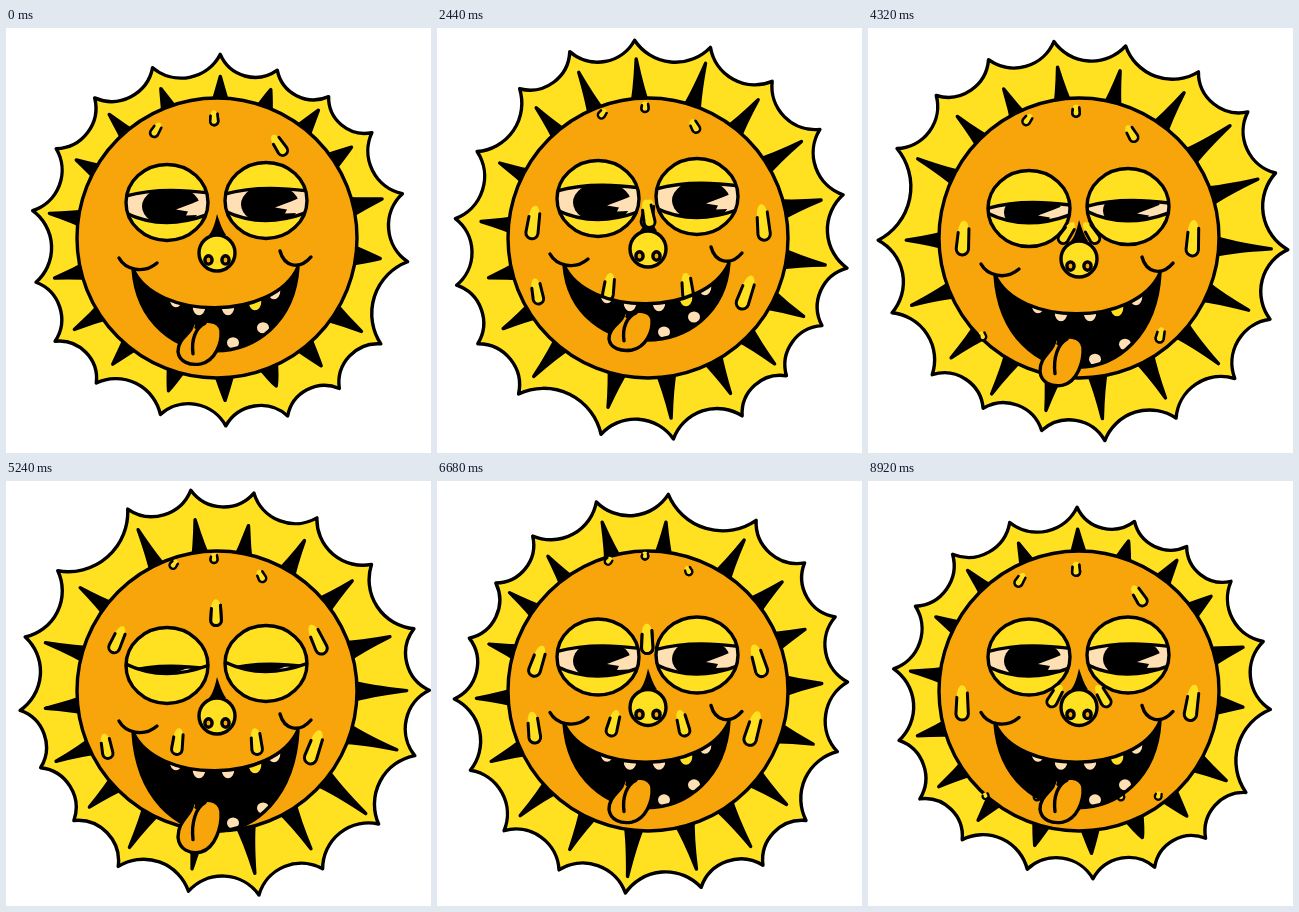
These frames come from a looping animation (425 px wide and 425 px high, 8.96 s). An HTML page:

```html
<!DOCTYPE html>
<html lang="en">
<head>
<meta charset="utf-8">
<title>Sweating sun</title>
<style>
  html, body { margin: 0; width: 100%; height: 100%; overflow: hidden; background: #fff; }
  svg { display: block; width: 100vw; height: 100vh; }
  .ink { stroke: #000; stroke-width: 3.4; stroke-linejoin: round; stroke-linecap: round; }
  .line { fill: none; }
  .yellow { fill: #ffe122; }
  .orange { fill: #f8a50b; }
  .cream { fill: #ffe0b5; }
</style>
</head>
<body>
<svg viewBox="0 0 425 425">
  <defs>
    <clipPath id="eyeClip"><ellipse rx="41" ry="38"/></clipPath>
    <clipPath id="mouthClip"><path id="mouthClipPath"/></clipPath>
  </defs>
  <path id="corona" class="ink yellow"/>
  <path id="spikes" class="ink" stroke-width="2"/>
  <circle class="ink orange" cx="211" cy="210" r="140"/>
  <g id="eyes">
    <path d="M211 187C209 196 207 203 203 208H220C216 202 214 196 211 187Z"/>
  </g>
  <g id="drops"></g>
  <g id="nose">
    <circle class="ink yellow" cx="211" cy="226" r="18"/>
    <g class="ink orange" stroke-width="2.6">
      <ellipse cx="202.500" cy="233" rx="3.600" ry="4.200"/>
      <ellipse cx="219.500" cy="233" rx="3.600" ry="4.200"/>
    </g>
  </g>
  <path id="mouth"/>
  <g clip-path="url(#mouthClip)">
    <g id="upperTeeth"></g>
    <g id="lowerTeeth"></g>
  </g>
  <path id="lips" class="ink line"/>
  <path id="creases" class="ink line" d="M113 231C119 242 137 248 151 236M274 224C278 239 293 244 305 230"/>
  <g id="tongue">
    <path class="ink orange" vector-effect="non-scaling-stroke"
      d="M187 292C187 304 172 306 172 321C173 331 184 335 195 333C209 330 216 313 215 300C213 290 197 288 190 297"/>
    <path class="ink line" vector-effect="non-scaling-stroke" d="M187 323C185 309 190 297 199 293"/>
  </g>
</svg>
<script>
const LOOP = 8960, BOB = 1120, STEP = 40;
const CENTER = { x: 214.3, y: 212.4 };
const DROP_TRAVEL = 537;

// Each ray: angle in degrees clockwise from the top, tip radius, spike radius.
const rays = [
  [0, 186, 165], [18.5, 179.5, 160], [37, 180, 164], [54.6, 186, 162], [75.6, 188, 168],
  [96.5, 188.5, 162], [122.8, 191, 169], [141.2, 190, 162], [159, 188, 157],
  [178.3, 185.5, 161], [199, 184, 160], [221, 189, 165], [238.6, 193.5, 172],
  [257.2, 189, 171], [279, 190, 174], [299.2, 188, 166], [318.6, 190, 169], [338.6, 185.5, 164]
];

// Sweat paths: progress, x, y, drop length.
const leftPath = [
  [40, 184, 74, 0], [90, 171, 80, 9], [115, 152, 99, 15], [154, 115, 152, 27],
  [187, 97, 187, 33], [223, 94, 223, 35], [250, 97, 250, 31], [268, 101, 268, 24],
  [293, 109, 295, 14], [316, 118, 316, 6], [328, 122, 325, 0]
];
const rightPath = [
  [70, 247, 80, 0], [90, 252, 91, 11], [115, 271, 115, 23], [154, 308, 152, 31],
  [179, 321, 178, 33], [194, 326, 194, 36], [223, 324, 223, 36], [250, 315, 251, 35],
  [268, 307, 269, 35], [293, 296, 293, 28], [316, 290, 316, 7], [328, 287, 324, 0]
];
const middlePath = side => [
  [70, 208, 72, 0], [90, 208, 75, 9], [115, 208, 88, 14], [154, 210, 124, 25],
  [179, 210, 155, 30], [195, 211, 187, 28], [208, 211 + side * 10, 203, 24],
  [223, 211 + side * 25, 216, 24], [250, 211 + side * 36, 246, 27],
  [263, 211 + side * 39, 258, 27], [293, 211 + side * 42, 292, 18],
  [316, 211 + side * 42, 317, 7], [328, 211 + side * 42, 324, 0]
];
const dropPaths = [leftPath, rightPath, middlePath(-1), middlePath(1)];
const dropStarts = [117, 48, -49, -154, -220, -313];

const $ = id => document.getElementById(id);
function add(parent, tag, attrs) {
  const el = document.createElementNS("http://www.w3.org/2000/svg", tag);
  for (const key in attrs) el.setAttribute(key, attrs[key]);
  return parent.appendChild(el);
}
const set = (el, name, value) => el.setAttribute(name, value);
const polar = (deg, r) => {
  const a = deg * Math.PI / 180;
  return [CENTER.x + r * Math.sin(a), CENTER.y - r * Math.cos(a)];
};
const at = p => p[0].toFixed(2) + " " + p[1].toFixed(2);

function makeEye(x, y) {
  const eye = add($("eyes"), "g", { transform: `translate(${x} ${y})` });
  const inside = add(eye, "g", { "clip-path": "url(#eyeClip)" });
  add(inside, "rect", { x: -42, y: -39, width: 84, height: 78, class: "cream" });
  add(inside, "ellipse", { cx: 4, cy: 4, rx: 29, ry: 20 });
  add(inside, "path", { class: "cream", d: "M9 7L25 1L42 -6V12L19 13L21 9Z" });
  const upper = add(inside, "path", { class: "ink yellow", d: "M-46 -6Q-10 -18 46 -10V-70H-46Z" });
  const lower = add(inside, "path", { class: "ink yellow", d: "M-46 9Q-5 32 46 11V70H-46Z" });
  add(eye, "ellipse", { rx: 41, ry: 38, class: "ink line" });
  return { upper, lower };
}
const eyes = [makeEye(161, 175.5), makeEye(260, 173.5)];

[[150, 259], [170, 272], [193, 280], [222, 280], [249, 275], [268, 264]].forEach(([cx, cy], i) =>
  add($("upperTeeth"), "ellipse", { cx, cy, rx: 8, ry: 10, class: "ink " + (i === 4 ? "yellow" : "cream") }));
[[227, 314], [257, 299]].forEach(([cx, cy]) =>
  add($("lowerTeeth"), "ellipse", { cx, cy, rx: 6, ry: 5.5, class: "cream" }));

const drops = dropPaths.flatMap(path => dropStarts.map(start => {
  const group = add($("drops"), "g", {});
  return {
    path, start, group,
    fill: add(group, "path", { class: "yellow" }),
    edge: add(group, "path", { class: "ink line" })
  };
}));

function sample(path, s) {
  let i = 1;
  while (i < path.length - 1 && path[i][0] < s) i++;
  const a = path[i - 1], b = path[i];
  const k = Math.min(1, Math.max(0, (s - a[0]) / (b[0] - a[0])));
  return [1, 2, 3].map(j => a[j] + (b[j] - a[j]) * k);
}

function drawDrop(drop, progress) {
  const { path, start, group, fill, edge } = drop;
  let s = start + DROP_TRAVEL * progress;
  if (s > 330) s -= DROP_TRAVEL;
  const [x, y, len] = sample(path, s);
  group.style.display = s < path[0][0] || len < 2 ? "none" : "";
  const [x0, y0] = sample(path, s - 12), [x1, y1] = sample(path, s + 12);
  const tilt = Math.atan2(y1 - y0, x1 - x0) * 180 / Math.PI - 90;
  const h = len / 2, w = Math.min(6.2, 2.4 + len * 0.11), r = Math.min(w, h);
  set(group, "transform", `translate(${x} ${y}) rotate(${tilt * 0.8})`);
  set(fill, "d", `M0 ${-h}C${w} ${-h} ${w} 0 ${w} ${h - r}A${w} ${r} 0 0 1 ${-w} ${h - r}C${-w} 0 ${-w} ${-h} 0 ${-h}Z`);
  set(edge, "d", `M${w * 0.85} ${-h * 0.55}L${w} ${h - r}A${w} ${r} 0 0 1 ${-w} ${h - r}L${-w * 0.85} ${-h * 0.3}`);
  set(edge, "style", `stroke-width:${Math.min(3, 2 + len * 0.04)}`);
}

function drawRays(progress) {
  const turn = 360 * progress, swell = Math.sin(Math.PI * progress);
  const size = 1 + 0.083 * swell, spikeSize = 1 + 0.093 * swell;
  const tips = rays.map(([a, r]) => polar(a + turn, r * size));
  let outline = "M" + at(tips[0]);
  tips.forEach((p, i) => {
    const q = tips[(i + 1) % tips.length];
    const radius = 0.64 * Math.hypot(q[0] - p[0], q[1] - p[1]);
    outline += `A${radius} ${radius} 0 0 0 ${at(q)}`;
  });
  set($("corona"), "d", outline + "Z");
  set($("spikes"), "d", rays.map(([a, , r]) => {
    const b = a + turn, tip = at(polar(b, r * spikeSize - 1));
    return `M${at(polar(b - 4.4, 130))}Q${at(polar(b - 1.6, 149))} ${tip}Q${at(polar(b + 1.6, 149))} ${at(polar(b + 4.4, 130))}Z`;
  }).join(""));
}

function drawFace(t) {
  const wave = Math.cos(2 * Math.PI * (t - 200) / BOB);
  const dy = 2 - 7 * wave;
  const shut = ((1 - wave) / 2) ** 2;
  const shift = `translate(0 ${dy})`;
  ["eyes", "nose", "upperTeeth", "creases"].forEach(id => set($(id), "transform", shift));
  eyes.forEach(({ upper, lower }) => {
    set(upper, "transform", `translate(0 ${14 * shut})`);
    set(lower, "transform", `translate(0 ${-13 * shut})`);
  });

  const chin = 331 - 19 * wave;
  const low = (chin - 60.25 - dy / 4) / 0.75;
  const mouth = `M127 ${242 + dy}C150 ${294 + dy} 268 ${294 + dy} 292 ${240 + dy}C285 ${low} 135 ${low} 127 ${242 + dy}Z`;
  ["mouth", "mouthClipPath", "lips"].forEach(id => set($(id), "d", mouth));
  set($("lowerTeeth"), "transform", `translate(0 ${chin - 322})`);

  const top = 301 - 18 * wave, bottom = 346.5 - 24.5 * wave;
  set($("tongue"), "transform", `translate(0 ${top}) scale(1 ${(bottom - top) / 42}) translate(0 -291)`);
}

function render(now) {
  const t = Math.floor((now % LOOP) / STEP) * STEP;
  drawRays(t / LOOP);
  drawFace(t);
  drops.forEach(drop => drawDrop(drop, t / LOOP));
}

let began = null;
function tick(now) {
  if (began === null) began = now;
  render(now - began);
  requestAnimationFrame(tick);
}
render(0);
requestAnimationFrame(tick);
</script>
</body>
</html>
```
